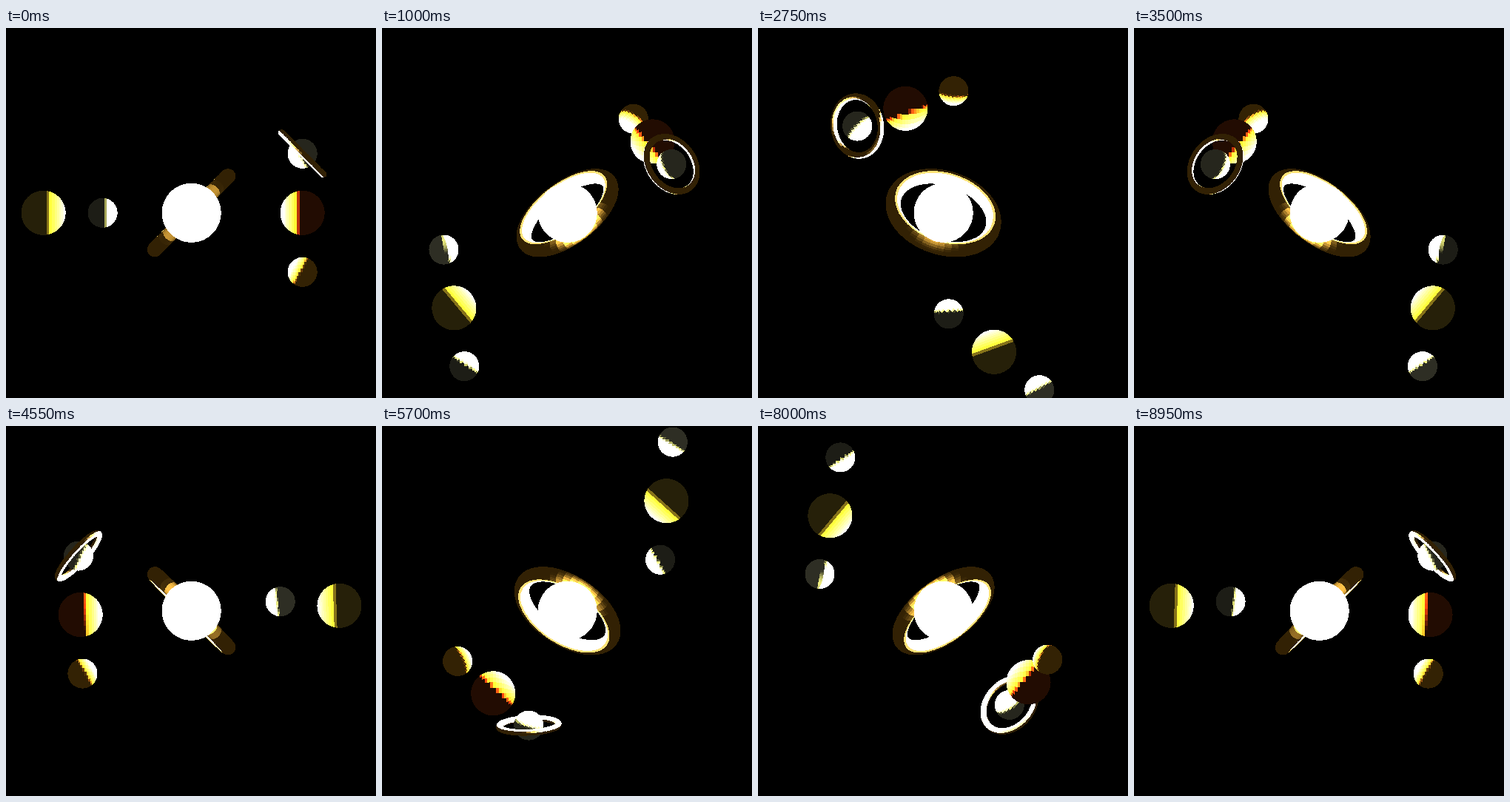
An HTML page with a canvas for the animation above (9 s loop, 500 px wide and 500 px high).

```html
<!DOCTYPE html>
<html lang="en">
<head>
<meta charset="utf-8">
<title>Orbits</title>
<style>
  html, body { margin: 0; width: 100%; height: 100%; overflow: hidden; background: #000; }
  canvas { display: block; width: 500px; height: 500px; }
</style>
</head>
<body>
<canvas id="stage" width="500" height="500"></canvas>
<script>
const SIZE = 500, CX = 250.6, CY = 249.8;
const STEP_MS = 50, STEPS = 180;
const { sin, cos, PI, floor, hypot } = Math;
const ctx = document.getElementById('stage').getContext('2d');
const image = ctx.createImageData(SIZE, SIZE);
const pixels = new Uint32Array(image.data.buffer);
const depth = new Float32Array(SIZE * SIZE);

// Material: ambient colour and strength of the sun light, per channel.
const materials = {
  gold:  { amb: [38, 32, 9],  dif: [1400, 1200, 260] },
  rust:  { amb: [34, 12, 2],  dif: [6000, 1500, 320] },
  amber: { amb: [51, 34, 4],  dif: [3000, 1500, 400] },
  slate: { amb: [29, 29, 22], dif: [2500, 2500, 1200] },
  ash:   { amb: [46, 46, 36], dif: [2500, 2500, 1200] },
  moss:  { amb: [38, 38, 29], dif: [2500, 2500, 1200] },
  ring:  { amb: [50, 33, 4],  dif: [2600, 2200, 1300] }
};
const SPOT = [600, 470, 200];

const dot = (a, b) => a[0] * b[0] + a[1] * b[1] + a[2] * b[2];
const mix = (basis, a, b, c) =>
  [0, 1, 2].map(i => a * basis[0][i] + b * basis[1][i] + c * basis[2][i]);
const cross = (a, b) => [
  a[1] * b[2] - a[2] * b[1],
  a[2] * b[0] - a[0] * b[2],
  a[0] * b[1] - a[1] * b[0]
];
const add = (a, b) => [a[0] + b[0], a[1] + b[1], a[2] + b[2]];

// Axes after a turn b about x followed by a turn a about z.
function turned(a, b = 0) {
  const ca = cos(a), sa = sin(a), cb = cos(b), sb = sin(b);
  return [[ca, sa, 0], [-sa * cb, ca * cb, sb], [sa * sb, -ca * sb, cb]];
}

function shade(mat, n, p, spot) {
  const lit = Math.max(0, -dot(n, p) / hypot(...p));
  const channel = i => Math.min(255, mat.amb[i] + lit * mat.dif[i] + spot * SPOT[i]);
  return (255 << 24 | channel(2) << 16 | channel(1) << 8 | channel(0)) >>> 0;
}

function plot(px, py, z, color) {
  if (px < 0 || py < 0 || px >= SIZE || py >= SIZE) return;
  const i = py * SIZE + px;
  if (z > depth[i]) {
    depth[i] = z;
    pixels[i] = color;
  }
}

function eachDiscPixel(pos, r, visit) {
  const sx = CX + pos[0], sy = CY - pos[1];
  for (let py = floor(sy - r); py <= sy + r; py++) {
    for (let px = floor(sx - r); px <= sx + r; px++) {
      const x = px + 0.5 - sx, y = sy - py - 0.5, h = r * r - x * x - y * y;
      if (h >= 0) visit(px, py, x, y, Math.sqrt(h));
    }
  }
}

// Sphere with flat facets: 24 bands from pole to pole, 24 around.
function sphere(pos, r, mat, [X, Y, Z]) {
  const band = PI / 24, slice = PI / 12, cells = new Map();
  eachDiscPixel(pos, r, (px, py, x, y, z) => {
    const n = [x / r, y / r, z / r];
    const i = floor(Math.asin(Math.max(-1, Math.min(1, dot(n, X)))) / band);
    const j = floor(Math.atan2(dot(n, Z), dot(n, Y)) / slice);
    const key = i * 100 + j;
    if (!cells.has(key)) {
      const lat = (i + 0.5) * band, lon = (j + 0.5) * slice;
      const m = mix([X, Y, Z], sin(lat), cos(lat) * cos(lon), cos(lat) * sin(lon));
      cells.set(key, shade(mat, m, add(pos, m.map(c => c * r * 0.85)), 0));
    }
    plot(px, py, pos[2] + z, cells.get(key));
  });
}

// Torus with flat facets; each facet is filled with sub x subV samples.
function torus(pos, R, r, axis, e1, slices, sides, sub, subV, spotlit) {
  const e2 = cross(axis, e1), du = 2 * PI / slices, dv = 2 * PI / sides;
  const out = u => {
    const c = cos(u), s = sin(u);
    return [c * e1[0] + s * e2[0], c * e1[1] + s * e2[1], c * e1[2] + s * e2[2]];
  };
  for (let i = 0; i < slices; i++) {
    const mid = out((i + 0.5) * du);
    const rims = Array.from({ length: sub }, (_, k) => out((i + (k + 0.5) / sub) * du));
    for (let j = 0; j < sides; j++) {
      const v = (j + 0.5) * dv, cv = cos(v), sv = sin(v);
      const n = mid.map((m, k) => cv * m + sv * axis[k]);
      const p = mid.map((m, k) => pos[k] + R * m + r * 0.5 * n[k]);
      let spot = 0;
      if (spotlit && n[2] > 0 && mid[2] > 0) {
        const off = hypot(p[0] + r * 0.5 * n[0], p[1] + r * 0.5 * n[1]);
        const fall = Math.max(0, Math.min(1, (55 - off) / 15));
        spot = fall * fall * n[2] * mid[2] ** 3;
      }
      const color = shade(materials.ring, n, p, spot);
      for (let q = 0; q < subV; q++) {
        const w = (j + (q + 0.5) / subV) * dv, a = R + r * cos(w), b = r * sin(w);
        for (const o of rims) {
          plot(floor(CX + pos[0] + a * o[0] + b * axis[0]),
               floor(CY - pos[1] - a * o[1] - b * axis[1]),
               pos[2] + a * o[2] + b * axis[2], color);
        }
      }
    }
  }
}

function draw(step) {
  const t = step / STEPS * 2 * PI, h = Math.SQRT1_2;
  pixels.fill(0xff000000);
  depth.fill(-1e4);

  // The sun always shows in front of its ring.
  eachDiscPixel([0, 0, 0], 40, (px, py) => plot(px, py, 1000, 0xffffffff));
  torus([0, 0, 0], 70, 9.6, [cos(t) * h, -h, -sin(t) * h], [sin(t), 0, cos(t)],
        48, 20, 15, 5, true);

  // Gold planet, its moons circle in the picture plane.
  const group = turned(t), spin = turned(-2 * t);
  const gold = mix(group, -200, 0, 0);
  sphere(gold, 30, materials.gold, group);
  sphere(add(gold, mix(spin, 80, 0, 0)), 20, materials.slate, spin);
  sphere(add(gold, mix(spin, -80, 0, 0)), 20, materials.ash, spin);

  // Rust planet, its moons circle about the line to the sun.
  const rust = mix(group, 150, 0, 0), tumble = turned(t, 3 * t);
  sphere(rust, 30, materials.rust, turned(0));
  sphere(add(rust, mix(tumble, 0, -80, 0)), 20, materials.amber, tumble);
  const ringed = add(rust, mix(tumble, 0, 80, 0));
  sphere(ringed, 20, materials.moss, tumble);
  const c = cos(4 * t) * h;
  torus(ringed, 40, 3.8, mix(tumble, c, c, sin(4 * t)), mix(tumble, -h, h, 0),
        48, 12, 9, 4, false);

  ctx.putImageData(image, 0, 0);
}

let shown = -1;
const start = performance.now();
function tick() {
  const step = floor((performance.now() - start) / STEP_MS) % STEPS;
  if (step !== shown) draw(shown = step);
  requestAnimationFrame(tick);
}
tick();
</script>
</body>
</html>
```
